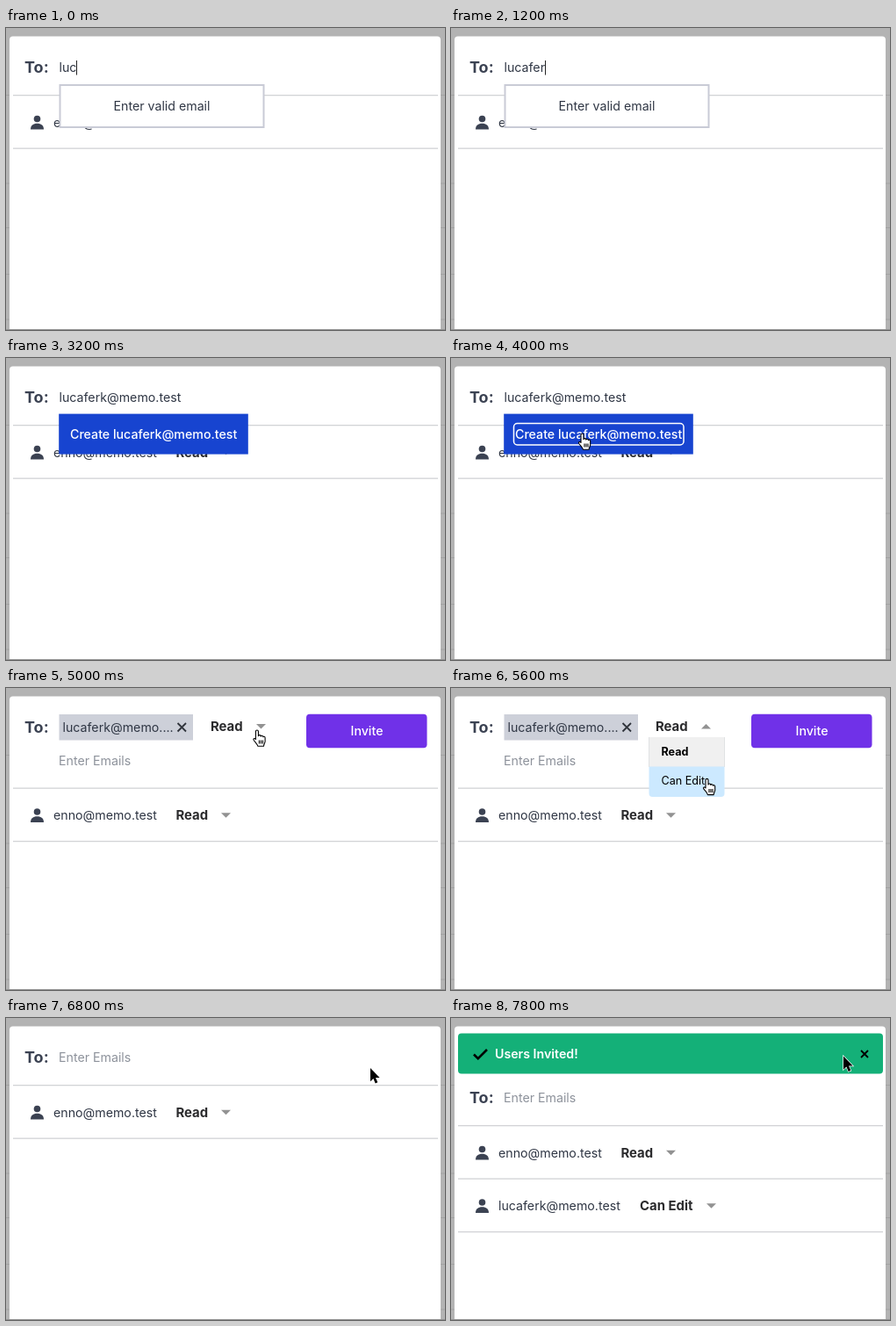
An HTML page that plays this animation: 500 by 344 pixels, repeating every 8000 ms.

```html
<!DOCTYPE html>
<html lang="en">
<head>
<meta charset="utf-8">
<title>Invite dialog</title>
<style>
  html, body { margin: 0; width: 100%; height: 100%; overflow: hidden; background: #b3b3b3; }
  svg { display: block; width: 500px; height: 344px; }
  text { font: 400 14.2px Inter, sans-serif; fill: #2f3644; white-space: pre; }
  .to { font-size: 18px; font-weight: 700; fill: #3b4252; }
  .role { font-size: 14.9px; font-weight: 700; fill: #2b2b2d; }
  .hint { fill: #8d929b; }
  .light { fill: #fff; font-weight: 500; }
  .mid { text-anchor: middle; }
  .menu text { font-size: 12.6px; fill: #000; }
  .rule { fill: #d2d3d6; }
  .tri { fill: #929292; }
</style>
</head>
<body>
<svg viewBox="0 0 500 344">
  <rect width="500" height="344" fill="#b3b3b3"/>
  <path d="M0 76.5H500M0 177H500M0 227.5H500M0 280.5H500M0 332H500" stroke="#a2a2a2"/>
  <path d="M4 344V13.5a4 4 0 0 1 4-4H491a4 4 0 0 1 4 4V344z" fill="#fff"/>

  <g id="banner">
    <rect x="8" y="17.5" width="484" height="46" rx="4" fill="#14b078"/>
    <path d="M26 41.5l4.8 4.7L41 36" fill="none" stroke="#000" stroke-width="2.6"/>
    <text class="light" x="50" y="46" style="font-weight:600">Users Invited!</text>
    <path d="M467 37l8 8m0-8l-8 8" stroke="#000" stroke-width="1.8"/>
  </g>

  <g id="body">
    <text class="to" x="21" y="51">To:</text>
    <text id="hint" class="hint" x="60" y="50">Enter Emails</text>
    <text id="typed" x="60.5" y="50"></text>
    <rect id="caret" y="37" width="1" height="16.5" fill="#222"/>

    <g id="chip">
      <rect x="60.5" y="30" width="152.5" height="29.5" fill="#cdd0d9"/>
      <text id="short" x="64.5" y="50"></text>
      <path d="M195.5 40l9.5 9.5m0-9.5l-9.5 9.5" stroke="#30343c" stroke-width="1.8"/>
      <text id="role" class="role" x="233" y="49"></text>
      <path id="tri" class="tri"/>
      <rect x="342" y="29.7" width="137.5" height="38.6" rx="4" fill="#7031e8"/>
      <text class="light mid" x="411" y="54">Invite</text>
    </g>

    <g id="list"><rect class="rule" x="8" y="76" width="484" height="1.3"/></g>

    <g id="warn">
      <rect x="61.5" y="65" width="232" height="48" fill="#fff" stroke="#c9cbd6" stroke-width="2"/>
      <text class="mid" x="177.5" y="94">Enter valid email</text>
    </g>

    <g id="create">
      <rect x="60.2" y="63.6" width="215.6" height="46" fill="#1744d0"/>
      <text id="make" class="light" x="73" y="91.5"></text>
      <rect id="ring" x="71.5" y="74.5" width="193.5" height="24.5" rx="4" fill="none" stroke="#fff" stroke-width="1.5"/>
    </g>

    <g id="menu" class="menu">
      <path d="M225.5 56H311.5V120a4 4 0 0 1-4 4H229.5a4 4 0 0 1-4-4z" fill="#cce9ff"/>
      <rect x="225.5" y="56" width="86" height="33.5" fill="#f0f0f0"/>
      <path d="M225.5 56V90M311.5 56V90" stroke="#dcdcdc" stroke-width=".7"/>
      <text x="239.5" y="77" style="font-weight:700">Read</text>
      <text x="239.5" y="110">Can Edit</text>
    </g>
  </g>

  <rect y="343" width="500" height="1" fill="#929292"/>

  <path id="arrow" d="M0 0V15.2L3.4 12L5.7 17.4L8.3 16.3L6 11.1H10.6Z"
        stroke="#fff" stroke-width="1.4" paint-order="stroke"/>
  <g id="hand" stroke="#000" stroke-width="1.1" stroke-linejoin="round">
    <path fill="#fff" d="M4 2.5c0-2 3-2 3 0v5.2c.3-1.6 2.8-1.4 2.8.4c.4-1.3 2.6-1 2.6.7c.5-1 2.3-.6 2.3 1v4c0 1.6-1.4 3-1.6 5.4H6.4c-.3-2-2.6-4-4.6-6.7c-1-1.5.5-2.6 2-1.4L4 11.5z"/>
    <path d="M8 12.5v4M10 12.5v4M12 12.5v4"/>
  </g>
</svg>
<script>
  const LOOP = 8000;
  const USER = 'lucaferk@memo.test';
  const OWNER = 'enno@memo.test';
  const $ = id => document.getElementById(id);
  const show = (id, on) => $(id).setAttribute('display', on ? 'inline' : 'none');
  const move = (id, x, y) => $(id).setAttribute('transform', `translate(${x} ${y})`);
  const triangle = (x, y, up) => up
    ? `M${x - 5.5} ${y + 2.7}h11l-5.5-5.4z`
    : `M${x - 5.5} ${y - 2.7}h11l-5.5 5.4z`;

  const row = (id, y, email, role, roleX, triX) => `
    <g id="${id}" transform="translate(0 ${y})">
      <circle cx="35.5" cy="103.5" r="3.8" fill="#3b4252"/>
      <path d="M28 115.6c0-4.8 3-6.9 7.5-6.9s7.5 2.1 7.5 6.9z" fill="#3b4252"/>
      <text x="54" y="112.5">${email}</text>
      <text class="role" x="${roleX}" y="112.5">${role}</text>
      <path class="tri" d="${triangle(triX, 107.5)}"/>
      <rect class="rule" x="8" y="136.5" width="484" height="1.3"/>
    </g>`;

  $('list').insertAdjacentHTML('beforeend',
    row('owner', 0, OWNER, 'Read', 193.4, 250.5) +
    row('guest', 60.5, USER, 'Can Edit', 215, 296.5));
  $('short').textContent = USER.split('.')[0] + '....';

  const arrow = (x, y) => ({ cursor: 'arrow', x, y });
  const hand = (x, y) => ({ cursor: 'hand', x, y });

  // Each step changes only the listed parts of the state.
  const steps = [
    [0, { view: 'typing', typed: 3, caret: 1, role: 'Read' }],
    [400, { caret: 0 }],
    [600, { typed: 4, caret: 1 }],
    [1000, { typed: 5 }],
    [1200, { typed: 7 }],
    [1400, { typed: 8 }],
    [1800, { typed: 9 }],
    [2200, { typed: 11 }],
    [2400, { typed: 12 }],
    [2600, { typed: 13 }],
    [2800, { typed: 15 }],
    [3000, { typed: 17, valid: 1 }],
    [3200, { typed: 18, caret: 0 }],
    [3400, arrow(115, 47)],
    [3800, hand(143, 84)],
    [4000, { ...hand(144, 85), ring: 1 }],
    [4200, { ...arrow(152, 86), view: 'chip' }],
    [4400, arrow(205, 74)],
    [4600, arrow(262, 56)],
    [4800, hand(279, 49)],
    [5000, hand(280.4, 47)],
    [5200, { menu: 1 }],
    [5400, hand(284, 80)],
    [5600, hand(286, 102.4)],
    [5800, { ...arrow(292, 102), menu: 0, role: 'Can Edit' }],
    [6000, arrow(318, 82)],
    [6200, hand(372, 53)],
    [6400, hand(403, 48)],
    [6600, { ...arrow(411, 54), view: 'empty' }],
    [6800, arrow(415, 57)],
    [7200, { view: 'done' }],
    [7800, arrow(447, 43.5)]
  ];

  function draw(s) {
    const typing = s.view === 'typing', chip = s.view === 'chip', done = s.view === 'done';
    const shift = chip ? 37.5 : 0;
    move('body', 0, done ? 46 : 0);
    move('list', 0, shift);
    move('hint', 0, shift);
    show('banner', done);
    show('guest', done);
    show('hint', !typing);
    show('typed', typing);
    show('chip', chip);
    show('menu', chip && s.menu);
    show('warn', typing && !s.valid);
    show('create', typing && s.valid);
    show('ring', s.ring);

    const text = USER.slice(0, s.typed);
    $('typed').textContent = text;
    $('make').textContent = 'Create ' + text;
    show('caret', typing && s.caret);
    if (typing) $('caret').setAttribute('x', Math.round(60.5 + $('typed').getComputedTextLength()));

    $('role').textContent = s.role;
    $('tri').setAttribute('d', triangle(s.role === 'Read' ? 290.5 : 314.5, 43.7, s.menu));

    for (const id of ['arrow', 'hand']) {
      show(id, s.cursor === id);
      if (s.cursor === id) move(id, s.x, s.y);
    }
  }

  function tick() {
    const t = performance.now() % LOOP;
    draw(Object.assign({}, ...steps.filter(([at]) => at <= t).map(([, part]) => part)));
    requestAnimationFrame(tick);
  }
  tick();
</script>
</body>
</html>
```
